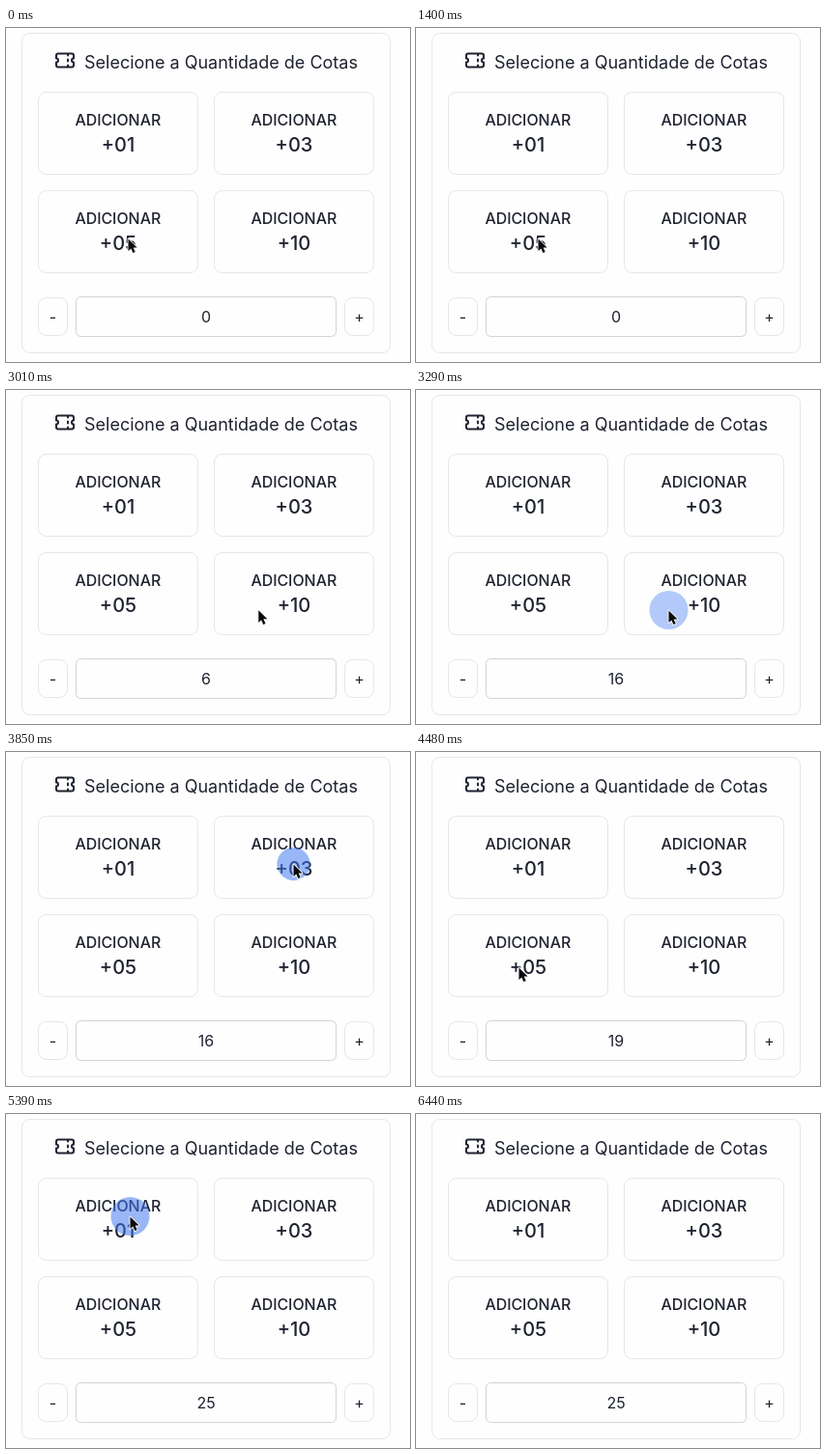
Recreate the animation shown at these times as an HTML page with a canvas. Size 418 by 346 pixels, loop 6.51 s.

```html
<!DOCTYPE html>
<html lang="pt-BR">
<head>
<meta charset="utf-8">
<title>Quantidade de Cotas</title>
<style>
html, body { margin: 0; width: 100%; height: 100%; overflow: hidden; background: #fefefe; }
canvas { display: block; width: 418px; height: 346px; }
</style>
</head>
<body>
<canvas id="stage"></canvas>
<script>
const W = 418, H = 346, LOOP = 6510, STEP = 70;
const FONT = 'Inter, "Liberation Sans", sans-serif';
const INK = '#1f2230', PAPER = '#fefefe', LINE = '#e6e6ea';
const FIRST = 1650, GAP = 720;        // time of the first press, time between presses
const REST = 230, TRAVEL = 420;       // wait after a press, time to the next stop
const COUNT_DELAY = 100, RIPPLE = 330;

const canvas = document.getElementById('stage');
const ctx = canvas.getContext('2d');
const dpr = window.devicePixelRatio || 1;
canvas.width = W * dpr;
canvas.height = H * dpr;

// where the pointer presses and what that adds; the last stop is off stage
const stops = [
  { x: 126, y: 217, add: 5 },
  { x: 128, y: 129, add: 1 },
  { x: 261, y: 227, add: 10 },
  { x: 297, y: 115, add: 3 },
  { x: 106, y: 222, add: 5 },
  { x: 128, y: 105, add: 1 },
  { x: 160, y: 352, add: 0 }
];
const presses = stops.length - 1;

const ticket = new Path2D('M15 5v2M15 11v2M15 17v2M5 5h14a2 2 0 0 1 2 2v3a2 2 0 0 0 0 4v3' +
  'a2 2 0 0 1-2 2H5a2 2 0 0 1-2-2v-3a2 2 0 0 0 0-4V7a2 2 0 0 1 2-2');
const arrow = new Path2D('M0 0V14.6L3.3 11.5L5.7 17L8.4 15.8L6 10.5H10.6Z');

const clamp = v => Math.max(0, Math.min(1, v));
const ease = p => p * p * (3 - 2 * p);

function box(x, y, w, h, r, stroke = LINE) {
  ctx.beginPath();
  ctx.roundRect(x + 0.5, y + 0.5, w - 1, h - 1, r);
  ctx.strokeStyle = stroke;
  ctx.lineWidth = 1;
  ctx.stroke();
}

function text(s, x, y, size, weight = 400, align = 'center') {
  ctx.font = `${weight} ${size}px ${FONT}`;
  ctx.textAlign = align;
  ctx.fillStyle = INK;
  ctx.fillText(s, x, y);
}

function card(amount, i) {
  const x = 33 + 182 * (i % 2), y = 66 + 102 * Math.floor(i / 2);
  box(x, y, 166, 86, 8);
  text('ADICIONAR', x + 82.8, y + 35, 15.9, 500);
  text('+' + String(amount).padStart(2, '0'), x + 83, y + 62, 20, 500);
}

function pointer(t) {
  const since = t - FIRST - REST;
  const i = Math.max(0, Math.min(presses - 1, Math.floor(since / GAP)));
  const p = ease(clamp((since - i * GAP) / TRAVEL));
  const a = stops[i], b = stops[i + 1];
  return [a.x + (b.x - a.x) * p, a.y + (b.y - a.y) * p];
}

function ripple(age, x, y) {
  if (age < 0 || age > RIPPLE) return;
  const r = 16 + 4 * clamp(age / 140);
  ctx.fillStyle = `rgba(62, 120, 240, ${0.52 * clamp((RIPPLE - age) / 170)})`;
  ctx.beginPath();
  ctx.arc(x + 0.5, y + 1, r, 0, Math.PI * 2);
  ctx.fill();
}

function drawPanel(total) {
  ctx.fillStyle = PAPER;
  ctx.fillRect(0, 0, W, H);
  box(16, 5, 382, 332, 8);

  ctx.save();
  ctx.translate(49, 21.5);
  ctx.strokeStyle = INK;
  ctx.lineWidth = 2;
  ctx.lineCap = ctx.lineJoin = 'round';
  ctx.stroke(ticket);
  ctx.restore();
  text('Selecione a Quantidade de Cotas', 81, 42, 18, 400, 'left');

  [1, 3, 5, 10].forEach(card);

  box(33, 279, 31, 40, 8);
  box(72, 278, 270, 42, 5, '#d2d2d7');
  box(350, 279, 31, 40, 8);
  text('-', 48.5, 305, 16);
  text('+', 365.5, 305, 16);
  text(String(total), 207, 305, 16);
}

function drawPointer(x, y) {
  ctx.save();
  ctx.translate(x + 0.5, y + 1.5);
  ctx.scale(0.86, 0.86);
  ctx.lineJoin = 'round';
  ctx.lineWidth = 2;
  ctx.strokeStyle = '#fff';
  ctx.stroke(arrow);
  ctx.fillStyle = '#0b0b0d';
  ctx.fill(arrow);
  ctx.restore();
}

function draw(t) {
  ctx.setTransform(dpr, 0, 0, dpr, 0, 0);
  const done = clamp((Math.floor((t - FIRST - COUNT_DELAY) / GAP) + 1) / presses) * presses;
  drawPanel(stops.slice(0, Math.round(done)).reduce((sum, s) => sum + s.add, 0));

  const [x, y] = pointer(t);
  for (let i = 0; i < presses; i++) ripple(t - FIRST - i * GAP, x, y);
  drawPointer(x, y);
}

const start = performance.now();
function tick() {
  const t = (performance.now() - start) % LOOP;
  draw(Math.floor(t / STEP) * STEP);
  requestAnimationFrame(tick);
}
tick();
</script>
</body>
</html>
```
